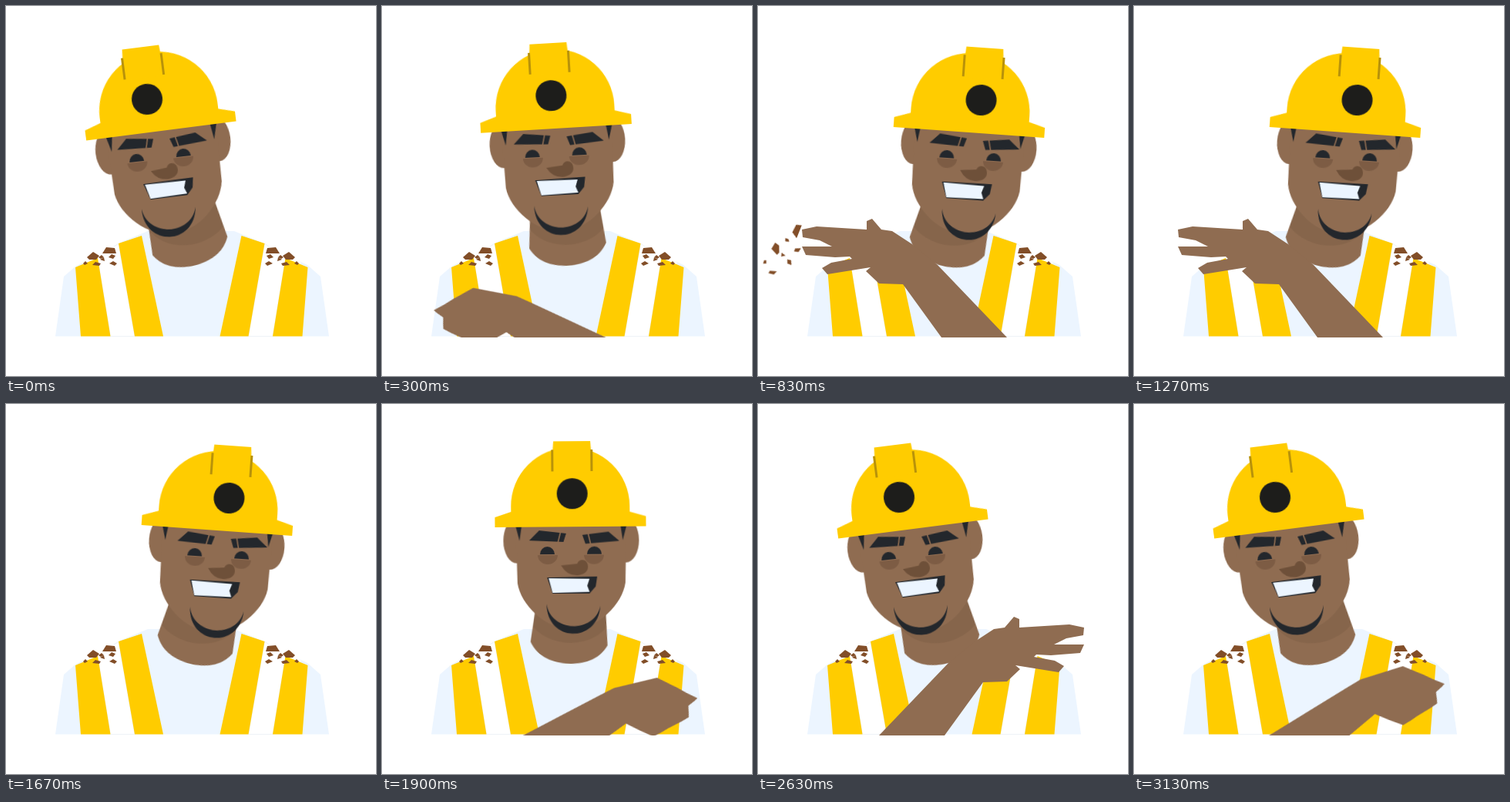
An HTML page for the animation above (3.16 s loop, 480x480 px).

```html
<!DOCTYPE html>
<html lang="en">
<head>
<meta charset="utf-8">
<title>Shoulder brush</title>
<style>
  html, body { margin: 0; width: 100%; height: 100%; overflow: hidden; background: #fff; }
  svg { display: block; width: 100vw; height: 100vh; }

  .skin { fill: #8f6c51; }
  .shade { fill: #86654b; }
  .lid { fill: #7d5c44; }
  .nose { fill: #6e5039; }
  .dark { fill: #23272c; }
  .gold { fill: #ffcc00; }
  .shirt { fill: #ecf5ff; }
  .dirt { fill: #824e28; }

  /* --a: leaning left, --b: leaning right */
  .sway { animation: sway 3160ms ease-in-out infinite; }
  @keyframes sway {
    0%, 2.5% { transform: var(--a); }
    19.8%, 52.5% { transform: var(--b); }
    69.8%, 100% { transform: var(--a); }
  }
  .lift { animation: lift 1580ms ease-in-out infinite; }
  @keyframes lift {
    0%, 5%, 39.6%, 100% { transform: translateY(0); }
    22% { transform: translateY(-4px); }
  }

  .arm, .hand, .dirt { animation: 3160ms linear var(--delay) infinite; }
  .arm { animation-name: reach; transform-origin: 345px 465px; }
  @keyframes reach {
    0%, 4.7% { transform: translate(0, 0) rotate(-50deg); animation-timing-function: cubic-bezier(.25, .5, .6, .95); }
    16.5% { transform: translate(0, 0) rotate(-3.5deg); animation-timing-function: ease-out; }
    18%, 40.8% { transform: translate(0, 0) rotate(0deg); animation-timing-function: ease-in-out; }
    44% { transform: translate(-24px, -2px) rotate(-1deg); animation-timing-function: ease-in; }
    49% { transform: translate(0, 0) rotate(-14deg); animation-timing-function: ease-in; }
    51.9%, 100% { transform: translate(0, 0) rotate(-50deg); }
  }

  .hand { animation-name: flick; }
  @keyframes flick {
    0%, 19%, 48.4%, 100% { d: var(--fist); }
    24.4%, 44% { d: var(--open); }
  }

  .dirt { animation-name: fly; transform-box: fill-box; transform-origin: center; }
  @keyframes fly {
    0%, 20.6% { transform: translate(0, 0) rotate(0deg); opacity: 1; animation-timing-function: cubic-bezier(.3, .4, .7, 1); }
    33.8% { transform: var(--away); opacity: 1; animation-timing-function: step-start; }
    33.9%, 44.2% { transform: var(--away); opacity: 0; animation-timing-function: step-end; }
    44.3%, 100% { transform: translate(0, 0) rotate(0deg); opacity: 1; }
  }

  .late .arm-box { animation: late 3160ms step-end infinite; }
  @keyframes late { 0% { opacity: 0; } 50%, 100% { opacity: 1; } }

  .sides {
    --fist: path("M188 361L168 364L149 366L140 357L134 350L128 344L120 336L113 328L114 325L115 322L117 317L118 314L116 311L114 308L112 305L110 301L125 299L140 296L148 295L154 294L161 293L168 292L217 322L233 338L323 430L238 430Z");
    --open: path("M188 361L157 360L140 344L146 339L90 348L83 340L95 333L122 328L119 325L100 326L62 323L57 312L96 312L80 304L58 300L57 290L76 286L141 290L141 279L148 276L160 290L174 292L200 309L233 336L323 430L238 430Z");
  }
</style>
</head>
<body>
<svg viewBox="0 0 480 480">
  <defs>
    <clipPath id="stage"><rect width="480" height="430"/></clipPath>
    <clipPath id="neck"><path d="M-43-95L-46-66L-50-26C-40-6-18 0 0 0S40-6 50-26L46-66L43-95Z"/></clipPath>
  </defs>

  <path class="shirt" d="M64 428.5L75 351L90 338L150 306L184 292H296L330 306L391 336L408 351L419 428.5Z"/>
  <g id="vest">
    <path fill="#fff" stroke="#e3e8ee" stroke-width=".5" d="M135.5 428.5L119 328L146 308L167 428.5Z"/>
    <path fill="#fff" d="M98 334L117 312H145L147 318L119 336Z"/>
    <path class="gold" d="M97 428.5L90 339L119 327L135.5 428.5ZM167 428.5L146 308L176 298L204 428.5Z"/>
  </g>
  <use href="#vest" transform="matrix(-1 0 0 1 481.5 0)"/>

  <g class="sway" style="--a:translate(245px,336.5px) rotate(-14deg);--b:translate(239px,337px) rotate(14deg)">
    <g clip-path="url(#neck)">
      <path class="skin" d="M-60-95H60V5H-60Z"/>
      <ellipse class="shade sway" cy="-75" rx="58" ry="48" style="--a:translateX(8px);--b:translateX(-8px)"/>
    </g>
  </g>

  <g class="lift">
    <g class="sway" style="--a:translate(204.5px,188px) rotate(-7deg);--b:translate(273px,188px) rotate(4deg)">
      <g class="skin">
        <ellipse cx="-71" cy="-7" rx="17" ry="29"/>
        <ellipse cx="71" cy="-7" rx="17" ry="29"/>
        <path d="M-72-35L-70 48C-66 76-34 108 0 108S66 76 70 48L72-35Z"/>
      </g>
      <path class="dark" d="M-74-34H-63L-67-7ZM74-34H63L67-7Z"/>
    </g>

    <g class="sway" style="--a:translate(199.5px,193.5px) rotate(-6.5deg);--b:translate(275.5px,194px) rotate(3.8deg)">
      <path class="lid" d="M-43 6H-17A13 12 0 0 1-43 6ZM17 6H43A13 12 0 0 1 17 6Z"/>
      <path class="dark" d="M-40 5A9.5 10 0 0 1-21 5ZM21 5A9.5 10 0 0 1 40 5Z"/>
      <path class="dark" d="M-54-13L-41-26L-6-22L-9.5-11ZM15-20L49-24L63-12L19-8.5Z"/>
      <path stroke="#8f6c51" stroke-width="1.6" d="M-13-25L-17-9M22-24L26-7"/>
    </g>

    <path class="nose sway" d="M-18-2L3-4C6-12 17-10 17 0C17 7 11 10 4 11Q-10 12-18-2Z"
      style="--a:translate(206px,214px) rotate(-7deg);--b:translate(280px,216px) rotate(4deg)"/>

    <g class="sway" style="--a:translate(212px,236px) rotate(-7deg);--b:translate(271px,239px) rotate(4deg)">
      <path class="dark" d="M-33-9L32-10L30 3L22 12L-26 12Z"/>
      <path class="shirt" d="M-31-8L22-7L19 2L22 10L-26 11Z"/>
    </g>

    <path class="dark sway" d="M-35-2C-33 48 33 48 35-2C28 35-28 35-35-2Z"
      style="--a:translate(211px,264px) rotate(-2deg);--b:translate(273.5px,268px) rotate(5deg)"/>

    <g class="sway" style="--a:translate(200.5px,155px) rotate(-7.3deg);--b:translate(274px,157px) rotate(4.1deg)">
      <path class="gold" d="M-98-6L-77-13V-20A77 76 0 0 1 77-20V-12L98-6V7H-98Z"/>
      <g class="sway" style="--a:translateX(-13px);--b:translateX(13px)">
        <path class="gold" d="M-24-104H24L27-64H-27Z"/>
        <path stroke="#b8920a" stroke-width="3" d="M-25.5-93V-65M25.5-93V-65"/>
        <circle cy="-36" r="20" fill="#1d1d1b"/>
      </g>
    </g>
  </g>

  <g class="sides" id="sides"></g>
</svg>
<script>
  const crumbs = [
    "125,321 130,313 141,314 143,321 134,321",
    "105,326 113,319 121,324 117,329 108,329",
    "133,326 137,322 142,324 139,328",
    "120,326 124,323 127,326 123,328",
    "122,329 127,326 128,331",
    "112,336 116,332 123,334 121,337",
    "134,334 139,331 144,334 141,337",
    "100,334 103,331 106,334 102,336"
  ];

  const crumb = (points, i) => {
    const x = -148 - i * 11 % 30, y = -45 + i * 29 % 80, turn = -120 - i * 40;
    return `<polygon class="dirt" points="${points}"
      style="--away:translate(${x}px,${y}px) rotate(${turn}deg)"/>`;
  };

  const side = (name, matrix, delay) => `
    <g class="${name}" transform="matrix(${matrix})" style="--delay:${delay}ms">
      <g clip-path="url(#stage)">
        ${crumbs.map(crumb).join("")}
        <g class="arm-box"><g class="arm"><path class="skin hand"/></g></g>
      </g>
    </g>`;

  document.getElementById("sides").innerHTML =
    side("early", "1 0 0 1 0 0", 0) + side("late", "-1 0 0 1 480 0", -1580);
</script>
</body>
</html>
```
